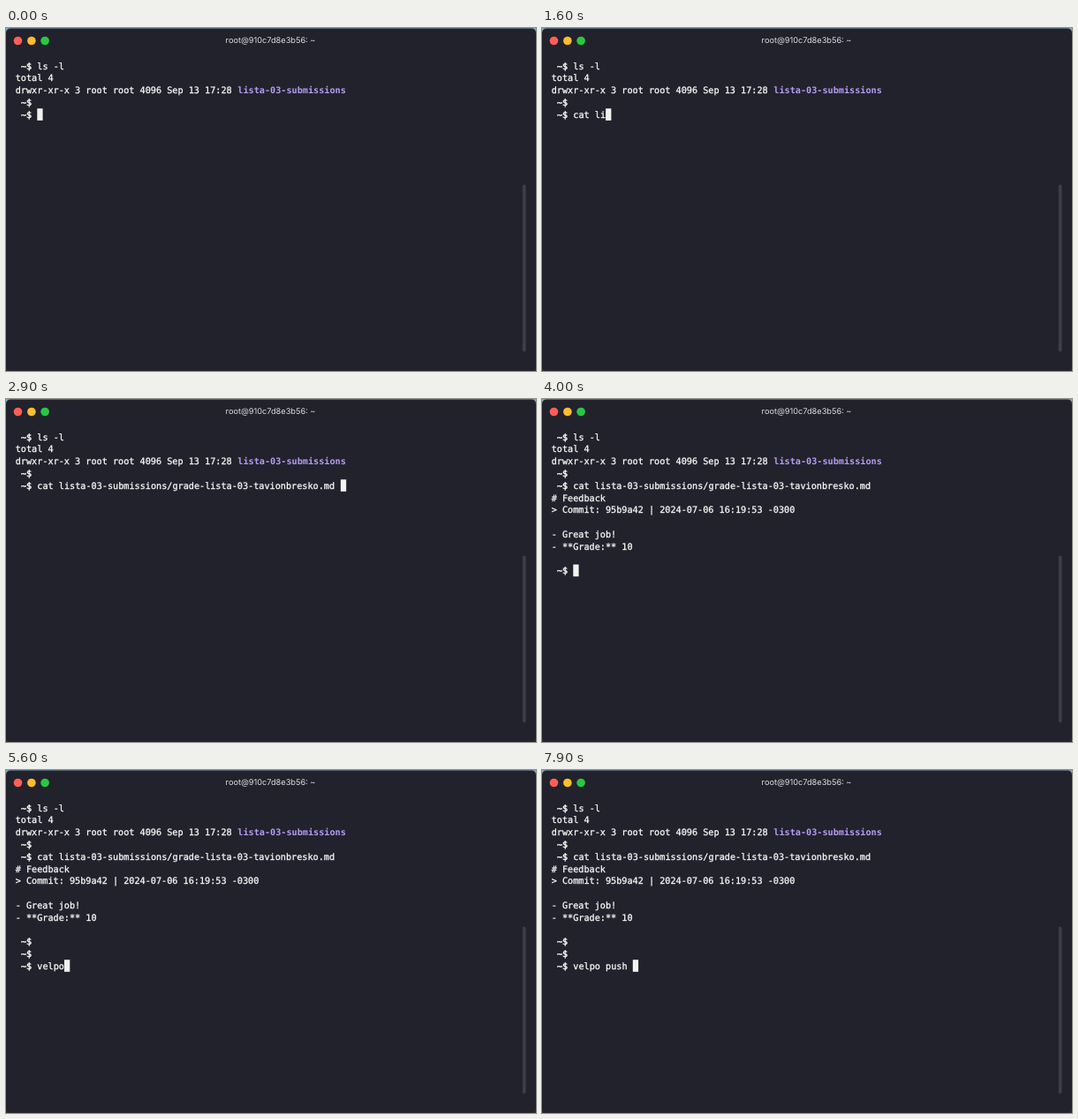
An HTML page that plays this animation: 600 by 389 pixels, repeating every 8000 ms.

```html
<!DOCTYPE html>
<html lang="en">
<head>
<meta charset="utf-8">
<title>Terminal</title>
<style>
  html, body { margin: 0; width: 100%; height: 100%; overflow: hidden; background: #22222d; }
  svg { display: block; width: 100%; height: 100%; }
  text { white-space: pre; text-rendering: geometricPrecision; }
  #screen { font: 400 10.19px "DejaVu Sans Mono", "Noto Sans Mono", monospace; }
  #screen text { fill: #fbfbf8; stroke: #fbfbf8; stroke-width: 0.28; }
  #screen .prompt { stroke-width: 0.45; }
  #screen .dir { font-weight: 700; fill: #b69cf2; stroke: none; }
  #title { font: 400 9.2px Inter, Roboto, sans-serif; fill: #dcdce0; text-anchor: middle; }
</style>
</head>
<body>
<svg viewBox="0 0 600 389" preserveAspectRatio="none">
  <rect width="600" height="389" fill="#7fa3b5"/>
  <rect y="194" width="600" height="195" fill="#35272e"/>
  <rect y="0.6" width="600" height="388" rx="5" fill="#22222d"/>
  <circle cx="13.5" cy="14.5" r="4.8" fill="#ff5f57"/>
  <circle cx="28.9" cy="14.5" r="4.8" fill="#febc2e"/>
  <circle cx="44.1" cy="14.5" r="4.8" fill="#28c840"/>
  <text id="title" x="299.5" y="17.3">root@910c7d8e3b56: ~</text>
  <rect x="584.7" y="177.5" width="3.8" height="189.5" rx="1.9" fill="#3e3d49"/>
  <g id="screen"></g>
</svg>
<script>
const LOOP = 8000, LEFT = 10.75, COL = 6.135, BASE = 46.7, ROW = 13.77;
const NS = "http://www.w3.org/2000/svg";
const screen = document.getElementById("screen");

function add(tag, attrs, text = "") {
  const el = document.createElementNS(NS, tag);
  for (const key in attrs) el.setAttribute(key, attrs[key]);
  el.textContent = text;
  return screen.appendChild(el);
}

const colX = col => LEFT + col * COL;
const rowY = row => BASE + row * ROW;
const write = (row, col, text, cls = "") =>
  add("text", { x: colX(col), y: rowY(row), class: cls }, text);
const prompt = row => write(row, 1, "~$", "prompt");

// Each entry is [time, text on the command line from then on].
const keys = (line, times) => times.map((t, i) => [t, line.slice(0, i + 1)]);

const folder = "lista-03-submissions";
const path = "cat " + folder + "/";
const catKeys = [
  ...keys("cat li", [700, 900, 1000, 1200, 1400, 1500]),
  [1900, path],
  [2200, path + "g"],
  [2400, path + "grade-lista-03-tavionbresko.md "]
];
const pushKeys = keys("velpo push ",
  [5200, 5300, 5400, 5500, 5600, 5700, 6100, 6600, 6900, 7000, 7200]);

// Rows where the prompt waits, and when it gets there.
const stops = [[0, 4], [3200, 11], [4100, 12], [4400, 13]];

const latest = (list, t, none) =>
  list.reduce((value, [at, next]) => (t >= at ? next : value), none);

prompt(0);
write(0, 4, "ls -l");
write(1, 0, "total 4");
write(2, 0, "drwxr-xr-x 3 root root 4096 Sep 13 17:28");
write(2, 41, folder, "dir");
prompt(3);
prompt(4);
const catLine = write(4, 4, "");
const pushLine = write(13, 4, "");

const later = [
  [3200, write(5, 0, "# Feedback")],
  [3200, write(6, 0, "> Commit: 95b9a42 | 2024-07-06 16:19:53 -0300")],
  [3200, write(8, 0, "- Great job!")],
  [3200, write(9, 0, "- **Grade:** 10")],
  ...stops.slice(1).map(([at, row]) => [at, prompt(row)])
];
const cursor = add("rect", { width: 6.3, height: 13.6, fill: "#f2f2ef" });

function draw(t) {
  const row = latest(stops, t, 4);
  catLine.textContent = latest(catKeys, t, "");
  pushLine.textContent = latest(pushKeys, t, "");
  for (const [at, el] of later) el.style.display = t >= at ? "" : "none";

  const typed = row === 4 ? catLine : pushLine;
  cursor.setAttribute("x", colX(4 + typed.textContent.length));
  cursor.setAttribute("y", rowY(row) - 10.5);
}

function tick() {
  draw(performance.now() % LOOP);
  requestAnimationFrame(tick);
}
tick();
</script>
</body>
</html>
```
